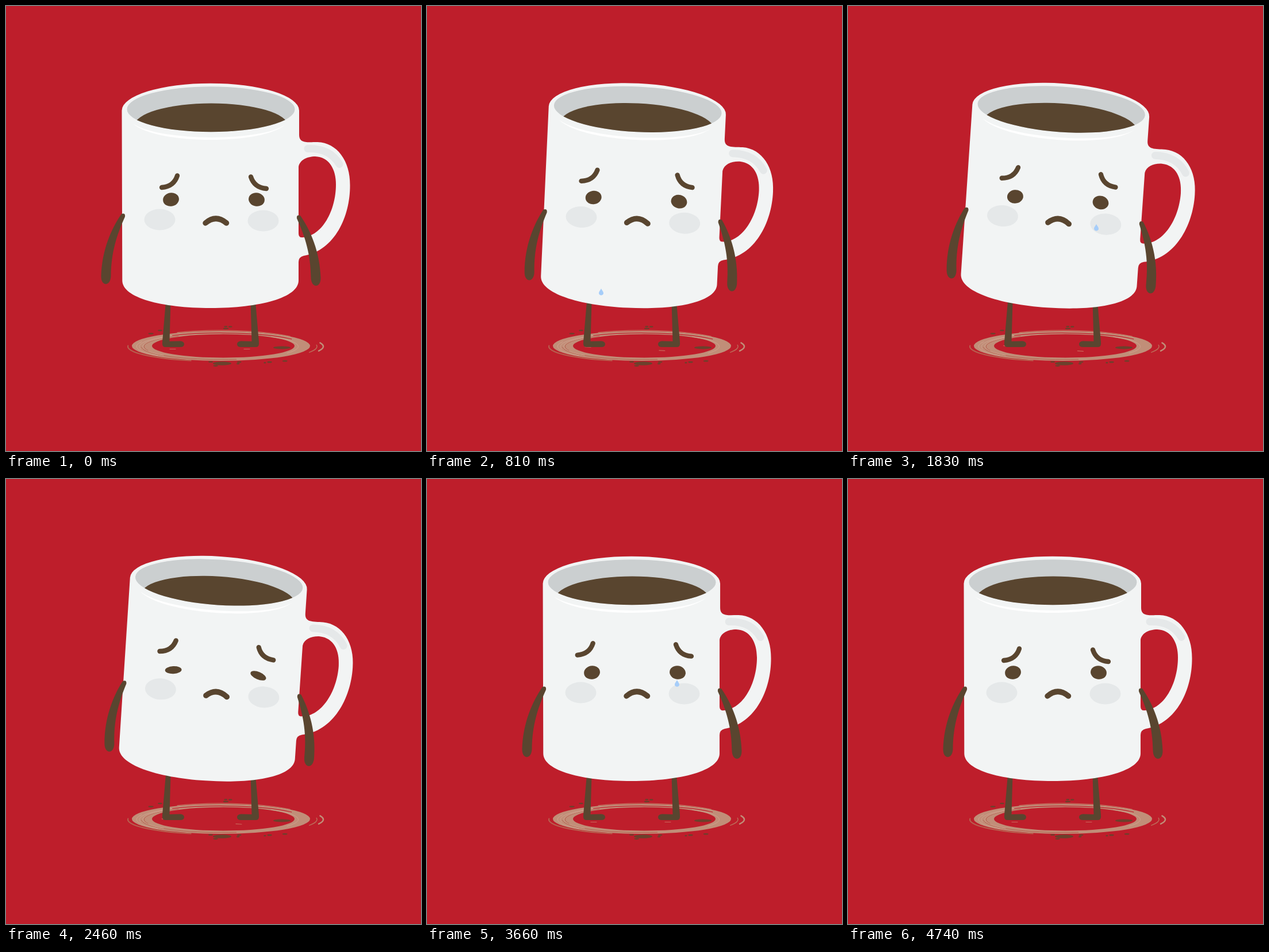
Write an HTML page with a canvas that moves like this. It is 722x775 px and loops after 5.34 s.

```html
<!DOCTYPE html>
<html lang="en">
<head>
<meta charset="utf-8">
<title>Sad mug</title>
<style>
  html, body { margin: 0; width: 100%; height: 100%; overflow: hidden; background: #be1e2b; }
  canvas { display: block; }
</style>
</head>
<body>
<canvas id="stage" width="722" height="775"></canvas>
<script>
const ctx = document.getElementById('stage').getContext('2d');
const LOOP = 5340, STEP = 30, LEAN = 4;
const RED = '#be1e2b', WHITE = '#f2f4f4', GREY = '#cbcfd0', BROWN = '#59452f',
      BLUSH = '#e5e8e9', TEAR = '#a6cdf9', STAIN = '#c18e78', SPECK = '#6b412c';

const clamp = v => Math.max(0, Math.min(1, v));
const ease = (t, from, to) => (1 - Math.cos(Math.PI * clamp((t - from) / (to - from)))) / 2;

function seeded(seed) {
  return () => (seed = seed * 16807 % 2147483647) / 2147483647;
}
function fill(path, color) {
  ctx.fillStyle = color;
  ctx.fill(new Path2D(path), 'evenodd');
}
function line(path, width, color) {
  ctx.strokeStyle = color;
  ctx.lineWidth = width;
  ctx.lineCap = 'round';
  ctx.stroke(new Path2D(path));
}
function oval(x, y, rx, ry, color, angle = 0) {
  ctx.fillStyle = color;
  ctx.beginPath();
  ctx.ellipse(x, y, rx, ry, angle, 0, 7);
  ctx.fill();
}
function arc(rx, ry, from, sweep, width, color) {
  ctx.strokeStyle = color;
  ctx.lineWidth = width;
  ctx.lineCap = 'round';
  ctx.beginPath();
  ctx.ellipse(374, 593, rx, ry, 0, from, from + sweep);
  ctx.stroke();
}
function turned(x, y, degrees, draw) {
  ctx.save();
  ctx.translate(x, y);
  ctx.rotate(degrees * Math.PI / 180);
  ctx.translate(-x, -y);
  draw();
  ctx.restore();
}
// Draws a left part, then its mirror image: x becomes span - x, y becomes y + drop.
function pair(span, drop, draw) {
  draw(false);
  ctx.save();
  ctx.translate(span, drop);
  ctx.scale(-1, 1);
  draw(true);
  ctx.restore();
}

function drawStain() {
  const random = seeded(11);
  arc(162, 26, 1.9, 1.3, 2, '#b8604f');
  arc(155, 28, 4.2, 1.4, 1.2, '#c5705f');
  arc(178, 26, -.25, .55, 2.5, STAIN);
  arc(167, 26, -.1, .5, 1.5, '#bd6a58');

  ctx.fillStyle = STAIN;
  ctx.beginPath();
  ctx.ellipse(374, 592, 155, 26, 0, 0, 7);
  ctx.ellipse(378, 592, 124, 20.5, 0, 0, 7);
  ctx.fill('evenodd');
  for (let i = 0; i < 6; i++) {
    const depth = random();
    arc(134 + 16 * depth, 22 + 2.5 * depth, random() * 6.3, 1 + random(), 1, i % 3 ? '#d0a28e' : '#b4604f');
  }
  arc(147, 23.5, 4.1, 1.6, 1.2, RED);

  for (let i = 0; i < 14; i++) {
    const angle = (i % 2 ? .9 : 3.9) + random() * .9;
    const reach = 1 + random() * .25;
    oval(374 + 155 * reach * Math.cos(angle), 592 + 28 * reach * Math.sin(angle),
         2 + 3 * random(), 1.3, SPECK);
  }
  oval(376, 622.5, 16, 3.2, SPECK);
  oval(480, 595, 15, 2.4, SPECK);
}

function drawLegs() {
  pair(712, 0, () => fill(
    'M278 515 H286.5 L284.5 584 L303 583.5 Q310 584 310 589 T303 594 H277 Q271 594 272 585 Z', BROWN));
}

function drawCup() {
  fill('M201.5 182 A154.2 47.3 0 0 1 510 182 V224 C510 240 524 237 542 237 C576 238 599 270 598.5 312 ' +
       'C599 366 572 426 518 435 Q509 437 509 446 V478 C509 508 442 526 356 526 S202.3 508 202.3 478 Z ' +
       'M509 280 C511 268 524 262 538 262 C562 263 574 284 574 311 C574 356 550 401 516 403 Q509 404 509 396 Z',
       WHITE);
  line('M525 248.5 Q563 247 580 275.5', 13, BLUSH);
  ctx.save();
  oval(356.5, 179.8, 146, 39.5, GREY);
  ctx.clip();
  oval(357, 209, 134, 39.5, BROWN);
  ctx.restore();
  fill('M221 205 C262 242 446 242 485 207 C446 236 270 237 221 205 Z', '#fff');
}

function drawFace(raise, shut) {
  pair(715, 2, () => oval(267.5, 372, 27, 18.5, BLUSH));
  pair(723, 0, right => oval(287 + shut, 337 + shut, 14 + shut, 11.7 * (1 - shut), BROWN,
                             -.2 + shut * (right ? -.3 : .2)));
  pair(724, 2, right => {
    ctx.save();
    ctx.translate((right ? -7 : -9.4) * raise, -9.5 * raise);
    line('M271 316 Q292 314.5 298 295.5', 8.3, BROWN);
    ctx.restore();
  });
  line('M347 378 Q365 362.5 383.5 378', 9.5, BROWN);
}

function drawArms(tilt) {
  pair(713, 3, right => turned(205, 362, (right ? -3 : -6) * tilt, () => fill(
    'M201 362 C183 388 167 425 165.5 470 C165 489 182 489 182.5 470 C183 430 192 400 207 367 Q208 360 201 362 Z',
    BROWN)));
}

function drawTear(age, x, drift) {
  const drop = 3.29e-4 * age * age;
  const size = clamp((age - 60) / 50);
  if (!size || drop > 225) return;
  ctx.save();
  ctx.translate(x + drift * drop, 352 + drop);
  ctx.scale(size, size);
  fill('M0 -6 C1 -3 4 -1 4 2 C4 7 -4 7 -4 2 C-4 -1 -1 -3 0 -6 Z', TEAR);
  ctx.restore();
}

function draw(t) {
  const tilt = ease(t, 0, 1290) - ease(t, 2280, 3715);
  const raise = ease(t, 0, 1290) - ease(t, 3580, 4740);
  const shut = .72 * (ease(t, 2010, 2270) - ease(t, 2340, 2620));
  const leaning = part => turned(361, 390, LEAN * tilt, part);

  ctx.fillStyle = RED;
  ctx.fillRect(0, 0, 722, 775);
  drawStain();
  leaning(() => pair(709, 0, () => line('M285 597.5 H295', 1.2, '#c9685b')));
  drawLegs();
  leaning(() => {
    drawCup();
    drawFace(raise, shut);
    drawArms(tilt);
  });
  drawTear(t - 144, 288.4, .1);
  drawTear(t - 1510, 435.4, -.1);
  drawTear(t - 3550, 435.4, -.1);
}

const start = performance.now();
function tick() {
  const t = (performance.now() - start) % LOOP;
  draw(Math.floor(t / STEP) * STEP);
  requestAnimationFrame(tick);
}
tick();
</script>
</body>
</html>
```
